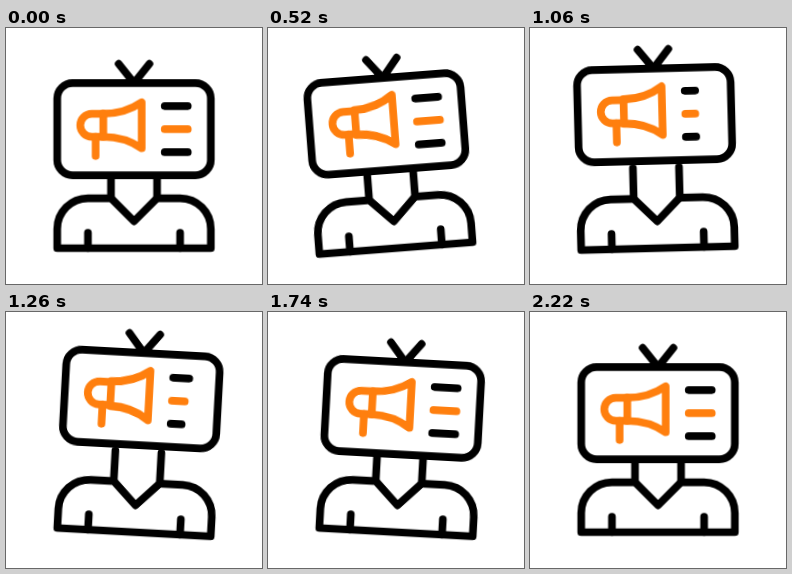
Recreate the animation shown at these times as an HTML page. Size 256x256 px, loop 2.36 s.

```html
<!DOCTYPE html>
<html lang="en">
<head>
<meta charset="utf-8">
<title>TV head</title>
<style>
  html, body { margin: 0; width: 100%; height: 100%; overflow: hidden; background: #fff; }
  svg { display: block; width: 100vw; height: 100vh; }
  .ink { fill: none; stroke: #000; stroke-width: 1; stroke-linecap: round; stroke-linejoin: round; }
  .orange { stroke: #ff7f0e; }
</style>
</head>
<body>
<svg viewBox="0 0 256 256">
  <!-- one unit is one stroke width; the origin is the pivot under the body -->
  <g class="ink" transform="translate(128 220.16) scale(7.68)">
    <g id="figure">
      <path d="M-10 0 V-2.5 A4 4 0 0 1 -6 -6.5 H-3 L0 -3.5 L3 -6.5 H6 A4 4 0 0 1 10 -2.5 V0 Z"/>
      <path d="M-6 -2 V0 M6 -2 V0"/>
      <path d="M-3 -10.5 V-6.5 M3 -10.5 V-6.5"/>
      <g id="head">
        <path d="M-2 -24 L0 -21.5 L2 -24"/>
        <rect x="-10" y="-21.5" width="20" height="12" rx="2" fill="#fff"/>
        <g class="orange" transform="translate(0 -16)">
          <path d="M-4 -1.5 H-5.5 A1.5 1.5 0 0 0 -5.5 1.5 H-4 Z"/>
          <path d="M-5 1.5 V4"/>
          <path id="bell" d="M-4 -1.5 C-2 -1.5 -.3 -2.1 1 -3 V3 C-.3 2.1 -2 1.5 -4 1.5"/>
        </g>
        <path class="bar" d="M4 -18.5 h3"/>
        <path class="bar orange" d="M4 -15.5 h3"/>
        <path class="bar" d="M4 -12.5 h3"/>
      </g>
    </g>
  </g>
</svg>
<script>
  const LOOP = 2360;
  const START = 40, END = 2200;

  // steps: [time in ms, value]; each span eases in and out
  function play(el, prop, steps, format) {
    const first = steps[0][1], last = steps[steps.length - 1][1];
    const frames = [[0, first], ...steps, [LOOP, last]].map(([time, value]) => ({
      offset: time / LOOP,
      [prop]: format(value),
      easing: "cubic-bezier(.55, 0, .45, 1)"
    }));
    el.animate(frames, { duration: LOOP, iterations: Infinity });
  }

  const find = id => document.getElementById(id);

  play(find("figure"), "transform",
    [[START, 0], [730, -5.2], [1460, 4.2], [END, 0]],
    a => `rotate(${a}deg)`);

  play(find("head"), "transform",
    [[START, 0], [1120, -1.9], [END, 0]],
    y => `translateY(${y}px)`);

  play(find("bell"), "transform",
    [[100, 1], [470, 1.07], [840, 1], [1210, 1.07], [1580, 1]],
    s => `scaleY(${s})`);

  // the bars shrink and grow one after another
  document.querySelectorAll(".bar").forEach((bar, i) => {
    const lag = i * 80;
    play(bar, "strokeDasharray",
      [[560 + lag, 3], [960 + lag, 1.3], [1580 + lag, 3]],
      len => `${len}px 9px`);
  });
</script>
</body>
</html>
```
